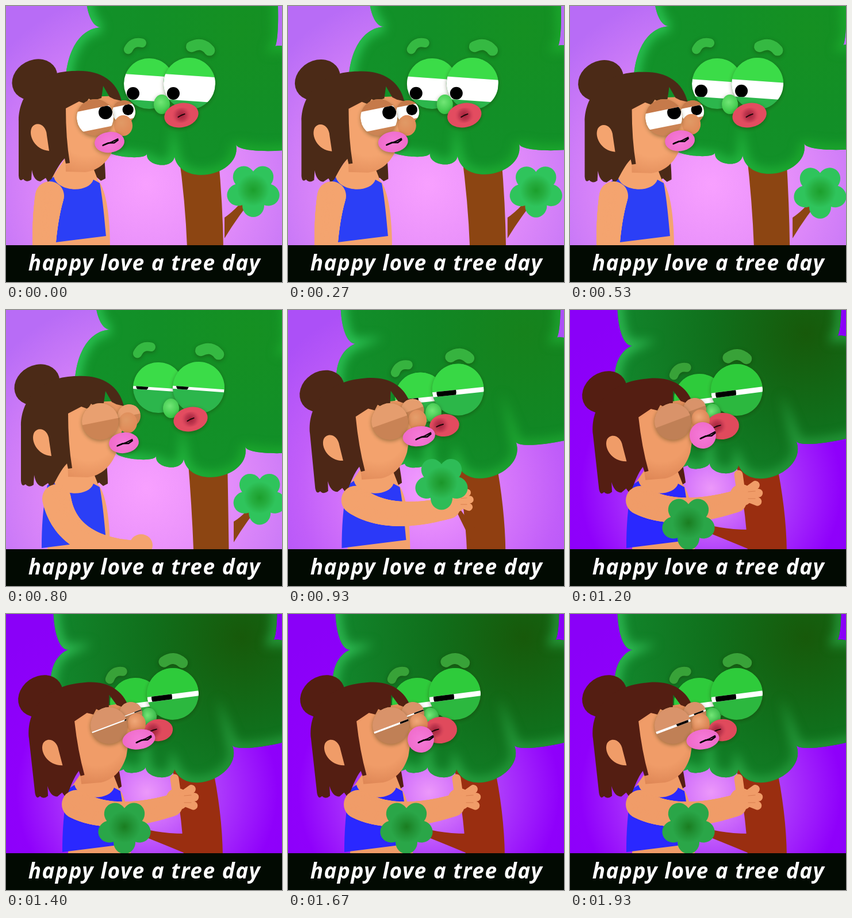
Animation, 480 px wide and 480 px high, one loop 1.99 s. Source, as an HTML page with a canvas:

```html
<!DOCTYPE html>
<html lang="en">
<head>
<meta charset="utf-8">
<title>Happy love a tree day</title>
<style>
html, body { margin: 0; width: 100%; height: 100%; overflow: hidden; background: #020a02; }
canvas { display: block; width: 480px; height: 480px; }
</style>
</head>
<body>
<canvas id="stage" width="480" height="480"></canvas>
<script>
const ctx = document.getElementById('stage').getContext('2d');
const LOOP = 1990, STEP = 1000 / 15, TAU = Math.PI * 2;

// Cusps between the lobes of the crown: apart x y, embracing x y, height of the next lobe.
const CROWN = [
  [160, -70, 105, -70, 24], [166, 37, 108, 62, 67], [175, 250, 205, 270, 9],
  [245, 257, 243, 264, 17], [293, 262, 293, 270, 42], [400, 240, 393, 227, 14],
  [530, 236, 530, 200, 10], [530, 90, 530, 70, 8], [466, 72, 463, 47, 9], [462, -70, 462, -70, 0]];
const TORSO = new Path2D('M75,305 L105,262 L148,272 L160,303 C175,320 181,370 181,420 L72,420 Z');
const SHIRT = new Path2D('M83,297 C90,324 144,326 152,302 L163,308 C169,340 172,380 174,400 L62,414 C62,380 64,340 72,305 Z');
const FACE = new Path2D('M100,160 L195,156 C206,175 203,190 196,215 L187,248 C178,270 162,286 138,289 L104,288 Z');
const HAIR = new Path2D('M22,200 C22,150 60,113 120,113 C162,111 192,128 201,165 L188,162 L180,158 L169,139 L166,160 L150,165 L144,161 L138,170 L127,166 L104,178 Q104,230 111,273 L104,274 L102,265 C92,275 85,290 79,301 L73,306 L69,299 L60,305 Q48,304 45,285 L44,302 Q36,308 30,301 Q23,307 22,295 Z');
const BACK_HAIR = new Path2D('M132,270 L170,252 C172,275 173,290 173,300 L165,304 L158,298 L150,304 L138,296 Z');
const EAR = new Path2D('M75,252 C50,250 38,225 45,211 C52,200 70,205 71,225 Z');

const lerp = (a, b, u) => a + (b - a) * u;
const mix = (a, b, u) => a.map((v, i) => lerp(v, b[i], u));
const ramp = (v, from, to) => Math.max(0, Math.min(1, (v - from) / (to - from)));
const smooth = u => u * u * (3 - 2 * u);
const rgb = hex => [1, 3, 5].map(i => parseInt(hex.slice(i, i + 2), 16));

// Everything moves by these few quantities.
function moodAt(step) {
  const near = ramp(step, 0, 12), kiss = 1 - (1 - ramp(step, 12, 16)) ** 3;
  return {
    near, kiss,
    lean: 16 * near ** 2,
    nod: smooth(ramp(step, 0, 10)),
    raise: smooth(ramp(step, 8, 12)),
    sweep: smooth(ramp(step, 12, 15)),
    tone: smooth(ramp(step, 12, 18)),
    peek: ramp(step, 18, 29),
    smack: kiss * Math.cos((step - 18) * TAU / 7)
  };
}

function fill(path, color) {
  ctx.fillStyle = color;
  ctx.fill(path);
}

function oval(x, y, rx, ry, color, turn = 0) {
  const p = new Path2D();
  p.ellipse(x, y, rx, ry, turn, 0, TAU);
  fill(p, color);
}

function line(points, width, color) {
  ctx.beginPath();
  points.forEach(([x, y]) => ctx.lineTo(x, y));
  ctx.lineWidth = width;
  ctx.lineCap = ctx.lineJoin = 'round';
  ctx.strokeStyle = color;
  ctx.stroke();
}

function radial(x, y, r, ...colors) {
  const g = ctx.createRadialGradient(x, y, 0, x, y, r);
  colors.forEach((c, i) => g.addColorStop(i / (colors.length - 1), c));
  return g;
}

function at(x, y, turn, draw) {
  ctx.save();
  ctx.translate(x, y);
  ctx.rotate(turn);
  draw();
  ctx.restore();
}

function shaded(draw) {
  ctx.save();
  ctx.shadowColor = 'rgba(30,40,0,.4)';
  ctx.shadowBlur = 7;
  ctx.shadowOffsetY = 2;
  draw();
  ctx.restore();
}

function eye([x, y], r, [top, bottom, turn], [px, py, pr], upper, lower) {
  shaded(() => oval(x, y, r, r, lower));
  at(x, y, 0, () => {
    ctx.beginPath();
    ctx.arc(0, 0, r, 0, TAU);
    ctx.clip();
    ctx.rotate(turn);
    ctx.fillStyle = upper;
    ctx.fillRect(-r, -r, 2 * r, r + top);
    ctx.beginPath();
    ctx.rect(-r, top, 2 * r, bottom - top);
    ctx.clip();
    ctx.fillStyle = '#fff';
    ctx.fillRect(-r, -r, 2 * r, 2 * r);
    ctx.rotate(-turn);
    oval(px, py, pr, pr, '#000');
  });
}

function brow([x, y, turn], size, color) {
  at(x, y, turn, () => {
    ctx.scale(size, size);
    shaded(() => {
      ctx.beginPath();
      ctx.moveTo(-16, 4);
      ctx.quadraticCurveTo(0, -9, 16, 4);
      ctx.lineWidth = 19;
      ctx.lineCap = 'round';
      ctx.strokeStyle = color;
      ctx.stroke();
    });
  });
}

function crown(kiss) {
  const path = new Path2D();
  const cusps = CROWN.map(([ax, ay, bx, by]) => mix([ax, ay], [bx, by], kiss));
  path.moveTo(...cusps[0]);
  for (let i = 1; i < cusps.length; i++) {
    const [x, y] = cusps[i - 1], [X, Y] = cusps[i];
    const h = CROWN[i - 1][4] / .75 / Math.hypot(X - x, Y - y);
    const nx = (y - Y) * h, ny = (X - x) * h;
    path.bezierCurveTo(x + nx, y + ny, X + nx, Y + ny, X, Y);
  }
  path.closePath();
  return path;
}

function leafAt({ lean, sweep }) {
  return [lerp(430 + lean * .7, 206, sweep), lerp(320 + lean * .4, 370, sweep) - 80 * Math.sin(Math.PI * sweep)];
}

function drawTree(m, tint) {
  const { kiss, lean, near } = m, bark = tint('#8c4512', '#9a2e10');
  // Leans with the tree while apart, then settles in the embrace.
  const go = (a, b) => mix([a[0] + lean, ...a.slice(1)], b, kiss);

  const [topL, topR, footL, footR] = mix(
    [300 + lean, 369 + lean, 315 + lean * .7, 378 + lean * .6], [286, 358, 309, 377], kiss);
  fill(new Path2D(`M${topL},255 Q${footL - 3},340 ${footL},420 L${footR},420 Q${footR - 1},345 ${topR},260 Z`), bark);

  at(lean * (1 - kiss), -3 * near * (1 - kiss), 0, () => {
    const leaves = crown(kiss);
    fill(leaves, radial(410, 40, 330, tint('#159022', '#17590a'), tint('#128f27', '#10701c'), tint('#12922a', '#12862c')));
    ctx.clip(leaves);
    const rim = ctx.createLinearGradient(90, 0, 400, 0);
    rim.addColorStop(0, tint('#2fcb5c', '#30bd55'));
    rim.addColorStop(1, tint('#1ca92d', '#25983a'));
    ctx.filter = 'blur(9px)';
    ctx.lineWidth = 18;
    ctx.strokeStyle = rim;
    ctx.stroke(leaves);
  });

  const [lx, ly] = leafAt(m), [bx, by] = go([380, 390], [316, 404]);
  const midX = (bx + lx) / 2, midY = (by + ly) / 2;
  fill(new Path2D(`M${bx},${by - 22} Q${midX},${midY - 4} ${lx},${ly - 6} L${lx + 6},${ly + 6} Q${midX},${midY + 8} ${bx},${by + 14} Z`), bark);

  const lid = tint('#3bdc48', '#2ecb3b'), under = tint('#2cb64c', '#2cb83f'), hair = tint('#35b942', '#38a238');
  const lids = [lerp(-14 * (1 - near), 0, kiss), lerp(30 - 25 * near ** 4, 9, kiss), lerp(.07, -.13, kiss)];
  const pupil = mix([-28, 17 - 21 * near ** 4, 11], [-19, 6, 18], kiss);
  brow(go([223, 67, -.45], [190, 104, -.55]), .82, hair);
  brow(go([339, 70, .2], [291, 80, .05]), 1, hair);
  eye(go([249, 135], [225, 155]), 44, lids, pupil, lid, under);
  eye(go([319, 135], [290, 139]), 45, lids, pupil, lid, under);
  const [nx, ny] = go([271, 171], [248, 180]);
  shaded(() => oval(nx, ny, 14, 17, radial(nx - 2, ny - 4, 20, '#72e676', tint('#35c445', '#2cae40'))));

  const [x, y, rx, ry, turn, shift] = go([305, 190, 30, 21, -.2, 0], [265, 202, 27, 21, -.1, -9]);
  shaded(() => oval(x, y, rx + m.smack * 2, ry + m.smack * 2, tint('#e34c60', '#e04a5c'), turn));
  at(x + shift, y, turn, () => {
    oval(0, 0, 19, 13, radial(0, 0, 18, '#a3223a', '#c23850', 'rgba(227,76,96,0)'));
    line([[-6, 2], [0, 0], [6, -1]], 2, '#1c0508');
  });
}

function drawArm({ kiss, raise }, skin, shade) {
  const hang = [76, 330, 66, 375, 66, 440], lift = [88, 328, 105, 415, 225, 420], hug = [122, 331, 182, 364, 288, 333];
  const [ax, ay, bx, by, cx, cy] = mix(mix(hang, lift, raise), hug, kiss);
  for (let i = 0; i <= 60; i++) {
    const u = i / 60, r = 25 - 6 * u;
    oval(lerp(lerp(ax, bx, u), lerp(bx, cx, u), u), lerp(lerp(ay, by, u), lerp(by, cy, u), u), r, r, skin);
  }
  at(cx + 10, cy - 11, 0, () => {
    oval(0, 0, 20, 19, skin);
    ctx.scale(kiss, kiss);
    line([[0, 0], [-5, -36]], 15, skin);
    for (let i = 0; i < 3; i++) {
      const a = -.62 + i * .5;
      line([[0, 0], [30 * Math.cos(a), 30 * Math.sin(a)]], 15, skin);
      if (i) line([[12, 12 * i - 18], [24, 13 * i - 20]], 1.2, shade);
    }
  });
}

function drawGirl(m, tint) {
  const { kiss, near, nod, peek, smack } = m;
  const skin = tint('#f4a46f', '#f09c68'), shade = tint('#e08a58', '#d98050'), hair = tint('#4b2a17', '#541e12');
  const go = (a, b) => mix([a[0] + 9 * nod, ...a.slice(1)], b, kiss);
  const inHead = draw => at(180 + lerp(4 * nod, 16, kiss), 190 + 2 * nod * (1 - kiss), -.11 * kiss, () => {
    ctx.translate(-180, -190);
    draw();
  });
  inHead(() => fill(BACK_HAIR, hair));
  at(36 * kiss, 0, 0, () => {
    fill(TORSO, skin);
    fill(SHIRT, tint('#2b3ff6', '#2a28ff'));
  });
  inHead(() => {
    fill(FACE, radial(140, 215, 90, skin, skin, shade));
    oval(50, 128, 41, 34, hair, -.5);
    fill(HAIR, hair);
    fill(EAR, skin);
  });

  const open = 1 - near ** 4, top = tint(near < .9 ? '#c67a4a' : '#e9a070', '#d9936a'), under = tint('#cc8454', '#c08056');
  const lids = [-16 * open, 20 * open + 4 * Math.sqrt(peek), lerp(-.2, -.36, kiss)];
  const pupil = mix([18, -9, 12], [lerp(46, 16, peek), -6, 11], kiss);
  const far = (list, x, y) => list.map((v, i) => v * (i < 2 ? x : y));
  eye(go([205, 184], [217, 173]), 20, far(lids, .7, 1), far(pupil, .4, .8), top, under);
  const [nx, ny] = mix([204 + 8 * nod, 208 - 12 * near ** 4], [227, 191], kiss);
  oval(nx, ny, 16, 18, radial(nx - 3, ny - 5, 20, tint('#e09a66', '#f0a878'), shade));
  eye(go([155, 194], [179, 194]), 32, lids, pupil, top, under);

  const [x, y, rx, ry, turn, shift] = mix(
    [180 + 25 * near ** 2, 237 - 6 * near ** 2, 26, 18, -.12, 0], [231, 218, 26, 20, -.15, 7], kiss);
  shaded(() => oval(x, y, rx - smack * 3, ry + smack * 3, radial(x, y, 30, '#f57ad8', '#ee68c8'), turn));
  at(x + shift, y, turn, () => {
    line([[-12, 4], [-2, 1], [8, 2], [15, -2]], 2.6, '#080206');
    line([[-10, 3], [4, 0], [15, -4]], 2.2, '#080206');
  });
  drawArm(m, skin, shade);
}

function drawLeaf(m, tint) {
  const [x, y] = leafAt(m), color = tint('#2fc45c', '#2aa648');
  for (let i = 0; i < 5; i++) {
    const a = -2.2 + i * TAU / 5;
    oval(x + Math.cos(a) * 27, y + Math.sin(a) * 27, 20, 19, color, a);
  }
  oval(x, y, 30, 30, radial(x, y, 28, tint('#1c9f2c', '#1a7d20'), tint('#26ae40', '#229336'), color));
}

function drawCaption() {
  ctx.fillStyle = '#020a02';
  ctx.fillRect(0, 416, 480, 64);
  ctx.font = 'italic 700 37px "Open Sans", "Noto Sans", sans-serif';
  ctx.letterSpacing = '1.5px';
  ctx.fillStyle = '#fff';
  ctx.textAlign = 'center';
  ctx.fillText('happy love a tree day', 241, 460);
}

function draw(step) {
  const m = moodAt(step);
  const tint = (a, b) => `rgb(${mix(rgb(a), rgb(b), m.tone).map(Math.round)})`;
  ctx.fillStyle = radial(245, 310, 340, tint('#f8a0ff', '#ec98fa'), tint('#ea92fb', '#b040fb'),
    tint('#d27ff8', '#8f00fb'), tint('#b86cf6', '#8a00f8'));
  ctx.fillRect(0, 0, 480, 480);
  drawTree(m, tint);
  drawGirl(m, tint);
  drawLeaf(m, tint);
  drawCaption();
}

let shown = -1;
function tick() {
  const step = Math.min(29, Math.floor((performance.now() % LOOP + 5) / STEP));
  if (step !== shown) draw(shown = step);
  requestAnimationFrame(tick);
}
tick();
</script>
</body>
</html>
```
